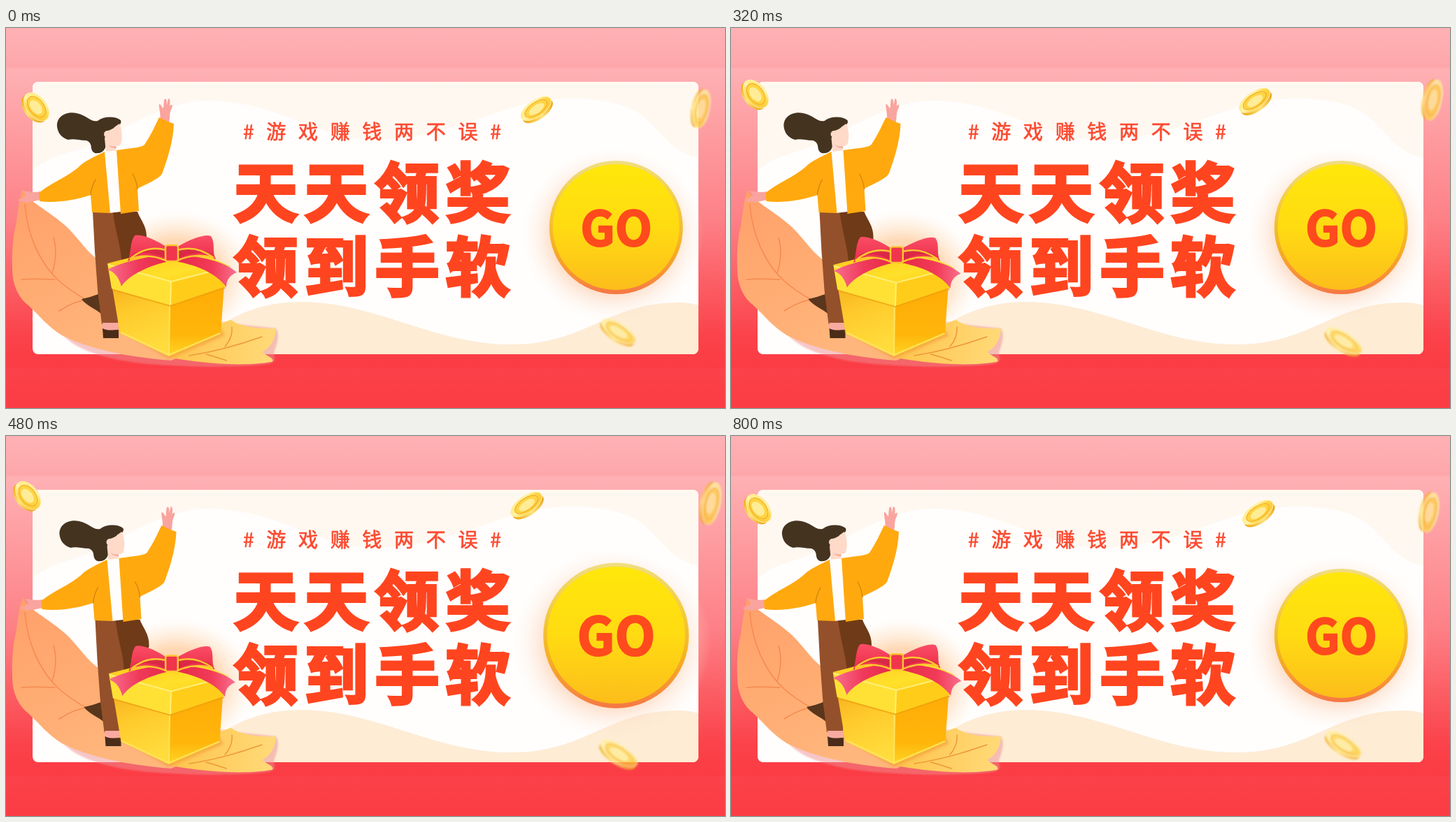
Recreate the animation shown at these times as an HTML page. Size 1028 px wide and 544 px high, loop 0.96 s.

```html
<!DOCTYPE html>
<html lang="zh">
<head>
<meta charset="utf-8">
<title>天天领奖</title>
<style>
html, body { margin: 0; width: 100%; height: 100%; overflow: hidden; background: #fd7b80; }
svg { display: block; width: 100vw; height: 100vh; }
text { font-family: "Noto Sans CJK SC", "Noto Sans CJK", "Noto Sans", sans-serif; }
.tag { font-size: 28px; font-weight: 500; letter-spacing: 17.7px; fill: #fc4a30; stroke: #fc4a30; stroke-width: .7; }
.title { font-size: 92px; font-weight: 900; letter-spacing: 9px; fill: #ff451f; stroke: #ff451f; stroke-width: 4; }
.go { font-size: 69px; font-weight: 700; text-anchor: middle; fill: #ff4a1d; stroke: #ff4a1d; stroke-width: 2; }
.line { fill: none; stroke-linecap: round; }
</style>
</head>
<body>
<svg viewBox="0 0 1028 544" preserveAspectRatio="none">
  <defs>
    <linearGradient id="sky" x2="0" y2="1"><stop stop-color="#feb1b4"/><stop offset=".5" stop-color="#fd8187"/><stop offset=".9" stop-color="#fb4149"/><stop offset="1" stop-color="#fb3c44"/></linearGradient>
    <linearGradient id="leaf" x1="0" y1="0" x2=".5" y2="1"><stop stop-color="#ff9f6a"/><stop offset=".5" stop-color="#ffab72"/><stop offset="1" stop-color="#ffb67c"/></linearGradient>
    <linearGradient id="leaf2"><stop stop-color="#ffc44e"/><stop offset="1" stop-color="#ffda78"/></linearGradient>
    <linearGradient id="disc" x2="0" y2="1"><stop stop-color="#ffe70a"/><stop offset=".5" stop-color="#ffdb12"/><stop offset="1" stop-color="#fcbd1b"/></linearGradient>
    <linearGradient id="rim" x2="0" y2="1"><stop stop-color="#f0dd82"/><stop offset=".3" stop-color="#f3ce42"/><stop offset=".65" stop-color="#f5b021"/><stop offset=".9" stop-color="#f88b3b"/><stop offset="1" stop-color="#f57645"/></linearGradient>
    <linearGradient id="gold" x2="1" y2="1"><stop stop-color="#ffe768"/><stop offset=".35" stop-color="#fff3a8"/><stop offset=".6" stop-color="#ffd84a"/><stop offset="1" stop-color="#fbc02f"/></linearGradient>
    <linearGradient id="edge"><stop stop-color="#f0a814"/><stop offset=".5" stop-color="#ffe27a"/><stop offset="1" stop-color="#edA318"/></linearGradient>
    <linearGradient id="lidTop" x2="1" y2="1"><stop stop-color="#ffc91d"/><stop offset=".6" stop-color="#ffe02a"/><stop offset="1" stop-color="#ffd01c"/></linearGradient>
    <linearGradient id="boxL" x2=".3" y2="1"><stop stop-color="#f7b11e"/><stop offset=".45" stop-color="#ffcb2c"/><stop offset="1" stop-color="#ffdc3c"/></linearGradient>
    <linearGradient id="boxR" x2="0" y2="1"><stop stop-color="#ffab06"/><stop offset=".7" stop-color="#ffb60b"/><stop offset="1" stop-color="#ffd426"/></linearGradient>
    <linearGradient id="red" x2="0" y2="1"><stop stop-color="#fb4d66"/><stop offset="1" stop-color="#ea2d49"/></linearGradient>
    <linearGradient id="tailL"><stop stop-color="#f8708f"/><stop offset=".5" stop-color="#f0395a"/><stop offset="1" stop-color="#e52a47"/></linearGradient>
    <linearGradient id="tailR"><stop stop-color="#e52a47"/><stop offset=".6" stop-color="#f23b58"/><stop offset="1" stop-color="#f8708f"/></linearGradient>
    <radialGradient id="halo"><stop offset=".68" stop-color="#fbc39c" stop-opacity=".5"/><stop offset=".85" stop-color="#fddcc6" stop-opacity=".25"/><stop offset="1" stop-color="#fde4d0" stop-opacity="0"/></radialGradient>
    <radialGradient id="glow"><stop offset=".55" stop-color="#ffb877" stop-opacity=".55"/><stop offset="1" stop-color="#ffd9b0" stop-opacity="0"/></radialGradient>
    <filter id="soft"><feGaussianBlur stdDeviation="1.2"/></filter>
    <filter id="mist"><feGaussianBlur stdDeviation="2"/></filter>
    <clipPath id="card"><rect x="38" y="77" width="952" height="390" rx="8"/></clipPath>
  </defs>

  <rect width="1028" height="544" fill="url(#sky)"/>
  <rect y="57.5" width="1028" height="429.5" fill="url(#sky)"/>

  <g clip-path="url(#card)">
    <rect x="38" y="77" width="952" height="390" fill="#fffefd"/>
    <path fill="#fff8f1" d="M38 77H990V186C950 178 940 150 905 122C870 98 790 97 745 108C680 124 620 160 525 160C440 158 390 104 285 104C215 106 150 160 100 175C70 184 50 192 38 205Z"/>
    <path fill="#feecd5" d="M38 467H250C290 440 330 393 420 392C530 392 610 453 722 453C830 453 860 393 962 393C975 393 984 395 990 397V467Z"/>
    <ellipse cx="244" cy="356" rx="110" ry="94" fill="url(#glow)"/>
  </g>

  <text class="tag" x="339" y="158.500">#游戏赚钱两不误#</text>
  <text class="title" x="325.500" y="270">天天领奖</text>
  <text class="title" x="325.500" y="375.500">领到手软</text>

  <path fill="#ee8f92" opacity=".5" filter="url(#soft)" d="M74 430C90 455 120 466 160 475C220 487 340 487 374 481C392 478 380 470 384 462C389 448 391 438 386 430L330 424L150 400Z"/>
  <path fill="url(#leaf)" d="M24 231C29 247 62 262 86 284C112 308 122 338 165 345L250 470L236 476C170 471 115 458 80 440C60 428 48 412 32 397C17 386 9 366 9 345C8 315 11 295 14 283C17 265 18 247 24 231Z"/>
  <g class="line" stroke="#f58a50" stroke-width="1.500">
    <path d="M27 252C30 295 48 338 78 364C100 382 118 392 136 398"/>
    <path d="M66 351C72 332 72 314 68 300M22 360C40 358 55 360 70 360M76 405C92 395 106 389 118 389"/>
  </g>
  <path fill="url(#leaf2)" d="M236 470C270 450 294 424 322 418C335 428 362 431 386 430C385 446 378 458 366 464C374 470 386 474 380 478C345 484 290 482 236 472Z"/>
  <path class="line" stroke="#ee973b" stroke-width="1.500" d="M262 469C295 464 335 453 366 442M313 456C320 448 324 438 323 428M286 467C296 470 307 473 315 476"/>

  <g id="woman">
    <path fill="#f9a49e" d="M49 234C38 236 32 234 24 233C25 236 29 238 28 240C24 244 20 245 16 246C20 249 28 250 35 249L49 246Z"/>
    <path fill="#f9a49e" d="M220 132C222 124 218 114 219 109C222 109 223 114 225 115L226 103C228 100 230 101 230 110L232 101C235 100 235 108 234 112C237 108 239 110 237 115C233 122 235 128 233 136Z"/>
    <path fill="#59361c" d="M108 388C117 386 124 384 132 381L136 409C128 402 114 397 108 388Z"/>
    <path fill="#6f3a17" d="M150 263H188C193 276 202 284 201 302L166 345L131 383L150 300Z"/>
    <path fill="#94502a" d="M124 263H153C156 290 166 320 165 335L160 424H137L131 375L127 320Z"/>
    <path fill="#f8aaa1" d="M138 422H160V434H138Z"/>
    <path fill="#4b2c18" d="M138 430C145 434 154 432 161 432V444H139Z"/>
    <path fill="#44331f" d="M73 141C72 126 87 119 101 122C116 125 121 135 131 133C140 126 156 126 164 132C166 137 161 141 156 141L146 157L143 163C144 173 138 181 127 179C118 174 126 166 115 161C104 161 97 158 89 160C79 157 74 150 73 141Z"/>
    <path fill="#ffdac8" d="M145 147C152 146 156 141 162 137C165 142 167 154 165 163C164 169 160 169 157 169L158 178H143L141 158Z"/>
    <circle cx="145" cy="152" r="5" fill="#ffdac8"/>
    <path fill="#f4a89c" d="M146 167C151 170 154 170 157 169L158 172C153 172 149 171 146 167Z"/>
    <path fill="#fffdfb" d="M142 177L159 175L164 263L147 265Z"/>
    <path fill="#ffa90e" d="M141 177C126 185 112 190 104 199C88 213 64 222 47 236L48 248C70 251 97 247 121 239L123 264L149 265Z"/>
    <path fill="#ffa90e" d="M158 175C178 172 195 171 198 167C207 154 213 140 219 128C227 132 233 135 240 137C239 164 230 190 223 209C217 217 201 223 188 230L190 262L164 266Z"/>
    <path class="line" stroke="#cf7d12" stroke-width="1.200" d="M121 239C122 230 125 222 128 217M188 231C187 222 185 215 181 209"/>
  </g>

  <g id="gift">
    <path fill="#f29536" opacity=".6" filter="url(#mist)" d="M158 430L233 474L313 440L300 420Z"/>
    <path fill="url(#boxL)" d="M151 366L234 390L233 470L163 437Z"/>
    <path fill="url(#boxR)" d="M234 390L312 366L307 438L233 470Z"/>
    <path class="line" stroke="#ffe45d" stroke-width="2" d="M234 398L233 468M165 436L233 468L306 437"/>
    <path fill="url(#lidTop)" d="M145 337L180 328L230 324L292 328L320 341L236 363Z"/>
    <path fill="#ffe136" d="M145 337L236 362L235 397L151 373Z"/>
    <path fill="#ffcd19" d="M236 362L320 341L314 370L235 397Z"/>
    <path class="line" stroke="#fff07a" stroke-width="2" d="M147 339L236 363L318 342M236 363L235 396"/>
    <path class="line" stroke="#eda010" stroke-width="2" opacity=".7" d="M153 375L235 398L313 372"/>
    <path fill="url(#tailL)" d="M230 325C205 326 165 335 145 346C155 349 161 356 165 370C176 353 205 340 233 334Z"/>
    <path fill="url(#tailR)" d="M244 326C270 325 312 333 330 350C321 353 315 360 315 371C300 350 270 339 243 334Z"/>
    <path fill="url(#red)" d="M230 314C216 304 194 294 184 297C177 306 179 323 174 334C191 325 211 325 230 332Z"/>
    <path fill="url(#red)" d="M244 314C260 304 284 294 293 298C300 308 294 321 300 331C283 324 263 325 244 332Z"/>
    <path fill="#b91533" opacity=".4" d="M229 318C211 313 193 316 179 325C193 319 214 322 229 330ZM245 318C263 313 281 316 296 325C281 319 262 322 245 330Z"/>
    <path class="line" stroke="#ffc62f" stroke-width="2.500" d="M229 318C211 313 193 317 177 331C194 324 213 326 229 333M245 318C263 313 281 317 297 329C281 324 262 325 245 333"/>
    <rect x="228" y="311" width="18" height="23" rx="3" fill="#f0354d" stroke="#ffc62f" stroke-width="2.500"/>
  </g>

  <g id="button">
    <ellipse cx="868" cy="296" rx="130" ry="124" fill="url(#halo)"/>
    <ellipse cx="872.300" cy="285.500" rx="95.500" ry="95.500" fill="url(#rim)"/>
    <ellipse cx="872.300" cy="285" rx="90.500" ry="90" fill="url(#disc)"/>
    <text class="go" x="872.500" y="311.500">GO</text>
  </g>
  <g id="coins"></g>
</svg>
<script>
const find = id => document.getElementById(id);
const STEP = 160;
const sway = [0, 1.5, 2.5, 3.5, 1.5, 0];

// dx, dy and grow are added per step of the drift
const coins = [
  { x: 42, y: 114, rx: 23, ry: 16, turn: 52, dx: -4, dy: -9.2, grow: 0 },
  { x: 759, y: 117, rx: 25, ry: 13.5, turn: -35, dx: -4.6, dy: -5.8, grow: .01 },
  { x: 993, y: 115.5, rx: 28, ry: 13, turn: 102, dx: 4.7, dy: -6.4, grow: .03, blur: true },
  { x: 875, y: 436, rx: 28, ry: 13, turn: 33, dx: .2, dy: 6.8, grow: .025, blur: true }
];

function coinShape({ rx, ry, turn, blur }) {
  const oval = (y, k, paint) => `<ellipse cy="${y}" rx="${rx * k}" ry="${(ry - 2) * k}" ${paint}/>`;
  return `<g transform="rotate(${turn})" ${blur ? 'filter="url(#soft)" opacity=".75"' : ""}>
    ${oval(2.5, 1, 'fill="url(#edge)"')}
    ${oval(-2, 1, 'fill="url(#gold)" stroke="#ffefa0" stroke-width="1"')}
    ${oval(-2, .74, 'fill="#ffd444" stroke="#f2b02a" stroke-width="1.2"')}
    ${oval(-1, .5, 'fill="#ffec96"')}
  </g>`;
}

find("coins").innerHTML = coins.map(c => `<g>${coinShape(c)}</g>`).join("");
const coinNodes = [...find("coins").children];

const place = (node, value) => node.setAttribute("transform", value);
const zoom = (x, y, k) => `translate(${x} ${y}) scale(${k}) translate(${-x} ${-y})`;

function draw(time) {
  const step = Math.floor(time / STEP) % 6;
  const drift = 3 - Math.abs(3 - step);
  coins.forEach((c, i) => place(coinNodes[i],
    `translate(${c.x + c.dx * drift} ${c.y + c.dy * drift}) scale(${1 + c.grow * drift})`));
  place(find("woman"), `translate(${sway[step]} 0)`);
  place(find("gift"), zoom(233, 470, 1 - .0075 * drift));
  place(find("button"), zoom(872.5, 285, step === 1 || step === 3 ? 1.09 : 1));
}

const start = performance.now();
function tick() {
  draw(performance.now() - start);
  requestAnimationFrame(tick);
}
draw(0);
tick();
</script>
</body>
</html>
```
